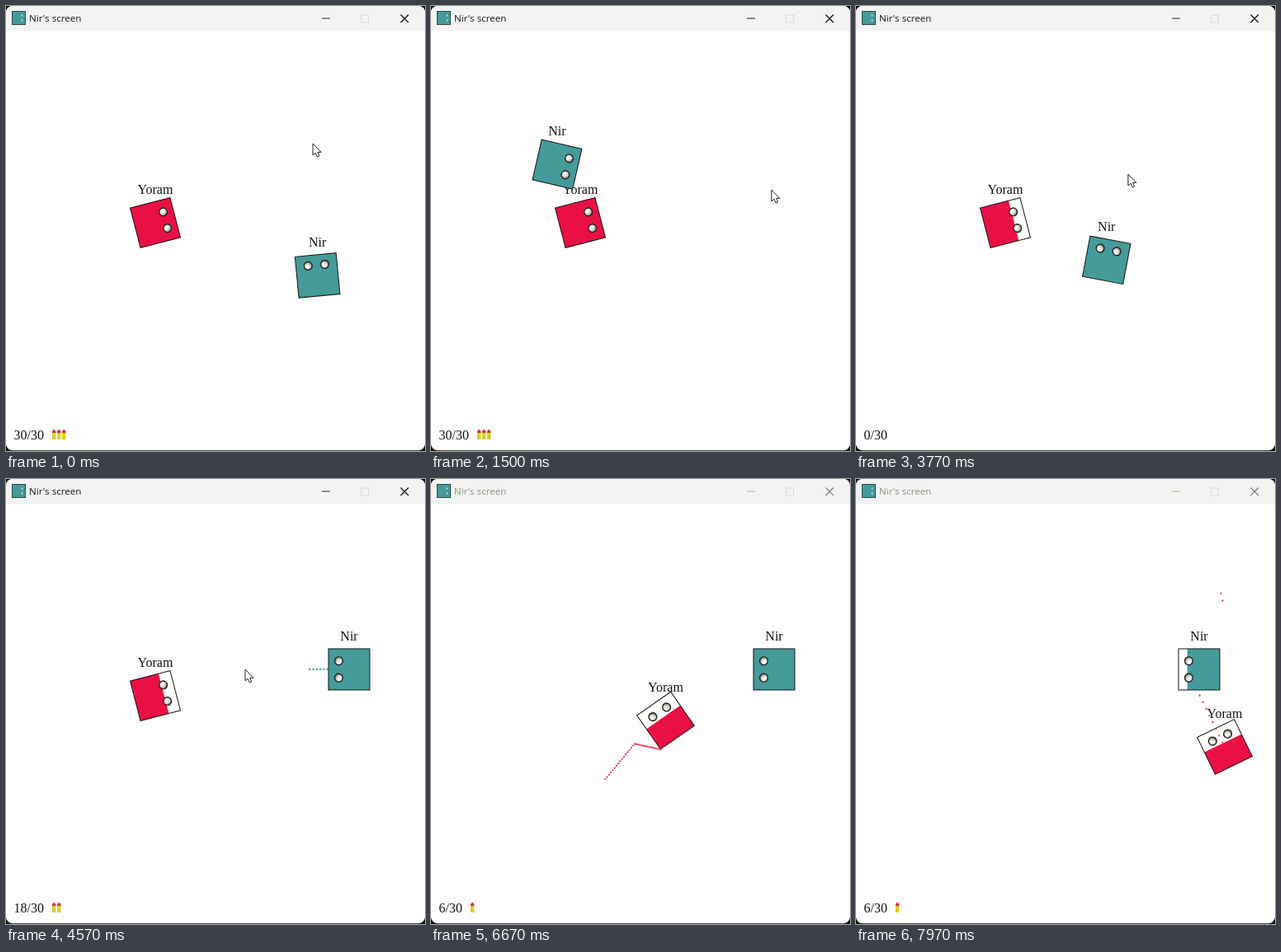
Recreate the animation shown at these times as an HTML page. Size 508 by 540 pixels, loop 8000 ms.

```html
<!DOCTYPE html>
<html lang="en">
<head>
<meta charset="utf-8">
<title>Square duel</title>
<style>
  html, body { margin: 0; width: 100%; height: 100%; overflow: hidden; background: #0c0c04; }
  svg { display: block; width: 508px; height: 540px; }
  .label { font: 16px "Liberation Serif", "Times New Roman", serif; fill: #14140c; }
  .title { font: 11.6px "Open Sans", "Noto Sans", sans-serif; }
</style>
</head>
<body>
<svg viewBox="0 0 508 540">
  <defs>
    <radialGradient id="eye" cx=".36" cy=".34" r=".7">
      <stop offset="0" stop-color="#fff"/>
      <stop offset=".5" stop-color="#e2e0da"/>
      <stop offset="1" stop-color="#77746c"/>
    </radialGradient>
    <clipPath id="win"><rect width="508" height="539.3" rx="8"/></clipPath>
  </defs>
  <g clip-path="url(#win)">
    <rect width="508" height="540" fill="#fdfdfe"/>
    <rect width="508" height="30.5" fill="#f3f3f3"/>
    <rect x="7.5" y="6.5" width="16" height="16" fill="#459a9a" stroke="#2c4a48"/>
    <path d="M19.5 10.5v2M19.5 16.5v2" stroke="#dfe8e4" stroke-width="1.5"/>
    <text id="title" class="title" x="28" y="19">Nir's screen</text>
    <path id="min" d="M383 15h10" fill="none"/>
    <rect x="430.5" y="11" width="9" height="9" fill="none" stroke="#dcdcca"/>
    <path id="close" d="M478.5 10.5l9.5 9.5M488 10.5l-9.5 9.5" fill="none" stroke-width="1.3"/>
    <g id="players"></g>
    <g id="dots"></g>
    <text id="ammo" class="label" x="9.5" y="526"></text>
    <g id="clips"></g>
    <path id="cursor" d="M0 0V14L3.2 11.2L5.4 16L7.7 15L5.7 10.3H10Z" fill="#fff" stroke="#22221a"/>
  </g>
</svg>
<script>
const LOOP = 8000, RELOAD = 4130, BLUR = 4950;
const SPEED = .25, LIFE = 1100, REACH = 27.5, DAMAGE = .63;
const $ = id => document.getElementById(id);

function set(el, attrs) {
  for (const k in attrs) el.setAttribute(k, attrs[k]);
  return el;
}
function add(parent, tag, attrs = {}) {
  return parent.appendChild(set(document.createElementNS('http://www.w3.org/2000/svg', tag), attrs));
}
const show = (el, on) => set(el, { visibility: on ? 'visible' : 'hidden' });

// Linear interpolation over rows of [time, ...values]
function at(rows, t) {
  const j = Math.max(1, rows.findIndex(r => r[0] >= t));
  const last = rows[rows.length - 1];
  if (t >= last[0]) return last.slice(1);
  const a = rows[j - 1], b = rows[j];
  const u = Math.max(0, (t - a[0]) / (b[0] - a[0]));
  return a.slice(1).map((v, n) => v + (b[n + 1] - v) * u);
}

function makePlayer(name, color, dot, path) {
  const g = add($('players'), 'g'), body = add(g, 'g');
  const box = { x: -25, y: -25, width: 50, height: 50 };
  add(body, 'rect', { ...box, fill: '#fff' });
  const fill = add(body, 'rect', { ...box, fill: color });
  add(body, 'rect', { ...box, fill: 'none', stroke: '#14140c' });
  for (const cy of [-10.2, 10.2])
    add(body, 'circle', { cx: 12.6, cy, r: 4.9, fill: 'url(#eye)', stroke: '#26241c', 'stroke-width': 1.4 });
  const label = add(g, 'text', { class: 'label', 'text-anchor': 'middle' });
  label.textContent = name;
  return {
    dot,
    pose: t => at(path, t),
    draw(t, hits) {
      const [x, y, a] = at(path, t);
      set(body, { transform: `translate(${x} ${y}) rotate(${a})` });
      set(fill, { width: 50 - hits * DAMAGE });
      set(label, { x, y: y - 35 });
    }
  };
}

// Key poses: time, x, y, facing angle
const foe = makePlayer('Yoram', '#ea1045', '#e0304a', [
  [5100, 181, 263, -14.5], [5480, 136, 257, 91], [5560, 136, 257, 91],
  [6150, 286, 471, 235], [6370, 290, 383, 235], [6590, 291, 345, 235], [6670, 284, 293, 235],
  [7010, 447, 325, 246], [7244, 447, 325, 270.5], [7600, 447, 325, 244]
]);
const hero = makePlayer('Nir', '#459a9a', '#3b9680', [
  [0, 378, 327, -95.5], [800, 76, 250, -12], [1500, 152.5, 192, 12.6],
  [1980, 368, 248, 171.3], [2420, 368, 248, 171.3], [2830, 334, 295, 30],
  [3000, 322, 301, 190], [3770, 303.5, 308.5, 281], [4170, 416, 231, 180]
]);
const pointer = [
  [0, 372, 167], [1500, 413, 223], [2200, 270, 258], [2830, 390, 292], [3770, 330, 204], [4170, 290, 231]
];

// A burst of shots along the facing direction; only the first `hits` can strike
function burst(by, from, every, n, hits = n) {
  const rival = by === hero ? foe : hero;
  return Array.from({ length: n }, (_, i) => {
    const start = from + i * every;
    const [x, y, a] = by.pose(start), rad = a * Math.PI / 180;
    const place = t => {
      const d = (t - start) * SPEED;
      return [x + d * Math.cos(rad), y + d * Math.sin(rad)];
    };
    const strikes = t => {
      const [px, py] = place(t), [rx, ry] = rival.pose(t);
      return Math.max(Math.abs(px - rx), Math.abs(py - ry)) < REACH;
    };
    let end = start;
    while (end < start + LIFE && !(i < hits && strikes(end))) end += 10;
    return {
      by, rival, start, end, place, hit: end < start + LIFE,
      el: add($('dots'), 'circle', { r: 1.15, fill: by.dot })
    };
  });
}

const shots = [
  burst(hero, 1560, 20, 7),
  burst(hero, 1985, 21, 21),
  burst(hero, 3020, 60, 2),
  burst(hero, 4380, 17, 24, 9),
  burst(foe, 6150, 14, 32),
  burst(foe, 7010, 36, 27)
].flat();

const clips = [0, 6, 12].map(x => {
  const g = add($('clips'), 'g', { transform: `translate(${x} 0)` });
  add(g, 'rect', { y: 517, width: 4.4, height: 9, fill: '#d9d024' });
  add(g, 'path', { d: 'M0 518V516L2.2 513.5L4.4 516V518Z', fill: '#d8343c' });
  return g;
});

function render(t) {
  for (const p of [foe, hero])
    p.draw(t, shots.filter(s => s.rival === p && s.hit && s.end <= t).length);

  for (const s of shots) {
    const [cx, cy] = s.place(t);
    show(set(s.el, { cx, cy }), t >= s.start && t < s.end);
  }

  const loaded = t < RELOAD ? 0 : RELOAD;
  const ammo = 30 - shots.filter(s => s.by === hero && s.start >= loaded && s.start <= t).length;
  $('ammo').textContent = ammo + '/30';
  clips.forEach((c, i) => show(c, ammo > i * 10));
  set($('clips'), { transform: `translate(${ammo > 9 ? 56 : 48} 0)` });

  const active = t < BLUR;
  set($('title'), { fill: active ? '#15150f' : '#8e8e80' });
  set($('min'), { stroke: active ? '#24241c' : '#b9bb80' });
  set($('close'), { stroke: active ? '#15150f' : '#85857a' });
  show(set($('cursor'), { transform: `translate(${at(pointer, t)})` }), active);
}

const begin = performance.now();
function tick() {
  render((performance.now() - begin) % LOOP);
  requestAnimationFrame(tick);
}
tick();
</script>
</body>
</html>
```
